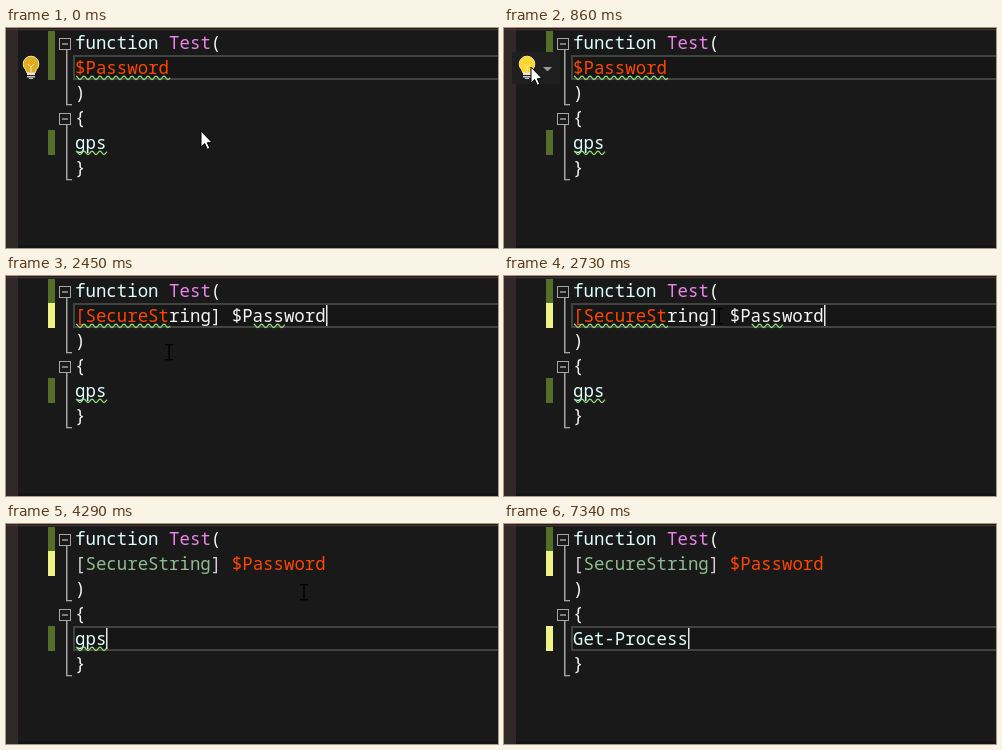
Recreate the animation shown at these times as an HTML page with a canvas. Size 492x220 px, loop 7500 ms.

```html
<!DOCTYPE html>
<html lang="en">
<head>
<meta charset="utf-8">
<title>Editor quick fixes</title>
<style>
html, body { margin: 0; width: 100%; height: 100%; overflow: hidden; background: #191919; }
canvas { display: block; width: 492px; height: 220px; }
</style>
</head>
<body>
<canvas id="stage" width="492" height="220"></canvas>
<script>
const ctx = document.getElementById('stage').getContext('2d');
const LOOP = 7500, W = 492, H = 220;
const LEFT = 69, TOP = 2, LINE = 25, CHAR = 10.45, BLINK = 530;
const CODE_FONT = '17.42px "Noto Sans Mono", monospace';
const UI_FONT = '11.2px "Open Sans", "Noto Sans", sans-serif';

// Times of the user's actions
const HOVER = 600, OPEN = 1610, PICK = 2450, CLICK = 3100, UP = 3810, DOWN = 4030;
const OPEN2 = 5050, PICK2 = 6210, EXPAND = 6280, LEAVE = 6840;

const C = {
  bg: '#191919', plain: '#f5f5f5', keyword: '#e0ffff', name: '#ee82ee',
  variable: '#ff4500', type: '#8fbc8f', op: '#d3d3d3', fold: '#a5a5a5',
  saved: '#556f2a', edited: '#eff284', wave: '#95db7d', popup: '#1f1f20', edge: '#3f3f42'
};

// Each move ends at x, y
const START = { x: 195, y: 103 };
const MOVES = [
  { from: 60, to: 660, x: 27, y: 39 },
  { from: 990, to: 1280, x: 142, y: 47 },
  { from: 1280, to: 1580, x: 44, y: 51 },
  { from: 1910, to: 1970, x: 59, y: 64 },
  { from: 1970, to: 2120, x: 163, y: 76 },
  { from: PICK, to: 2730, x: 215, y: 40 },
  { from: 2730, to: 2940, x: 257, y: 41 },
  { from: CLICK, to: 3220, x: 298, y: 68 },
  { from: 6750, to: LEAVE, x: 340, y: 200 }
];

const within = (t, a, b) => t >= a && t < b;

function mouse(t) {
  let { x, y } = START;
  for (const m of MOVES) {
    const u = Math.min(1, Math.max(0, (t - m.from) / (m.to - m.from)));
    const s = u * u * (3 - 2 * u);
    x += (m.x - x) * s;
    y += (m.y - y) * s;
  }
  return [x, y];
}

function passwordLine(t) {
  if (t < PICK) return [['$Password', C.variable]];
  if (t < CLICK) return [['[SecureSt', C.variable], ['ring] $Password', C.plain]];
  return [['[', C.op], ['SecureString', C.type], ['] ', C.op], ['$Password', C.variable]];
}

function codeLines(t) {
  return [
    [['function ', C.keyword], ['Test', C.name], ['(', C.plain]],
    passwordLine(t),
    [[')', C.plain]],
    [['{', C.plain]],
    [[t < EXPAND ? 'gps' : 'Get-Process', C.keyword]],
    [['}', C.plain]]
  ];
}

function caretAt(t, lines) {
  const row = t < UP ? 1 : t < DOWN ? 0 : Math.min(4, 1 + Math.floor((t - DOWN) / 86));
  const length = lines[row].reduce((n, [text]) => n + text.length, 0);
  const col = Math.min(within(t, CLICK, EXPAND) ? 18 : 24, length);
  const blinkOn = t < EXPAND || (t - EXPAND) % (2 * BLINK) < BLINK;
  const hidden = t < PICK || within(t, CLICK + 480, UP) || within(t, OPEN2, EXPAND);
  return { row, col, on: blinkOn && !hidden };
}

function rect(x, y, w, h, color) {
  ctx.fillStyle = color;
  ctx.fillRect(x, y, w, h);
}

function panel(x, y, w, h, fill, border) {
  rect(x, y, w, h, border);
  rect(x + 1, y + 1, w - 2, h - 2, fill);
}

function stroke(color, width) {
  ctx.strokeStyle = color;
  ctx.lineWidth = width;
  ctx.stroke();
}

function write(text, x, y, font, color) {
  ctx.font = font;
  ctx.fillStyle = color;
  ctx.fillText(text, x, y);
}

function codeLine(parts, row) {
  let col = 0;
  for (const [text, color] of parts) {
    write(text, LEFT + col * CHAR, 20.5 + row * LINE, CODE_FONT, color);
    col += text.length;
  }
}

function squiggle(row, col, count) {
  const x0 = LEFT + col * CHAR + 1, y = TOP + row * LINE + 22.8;
  ctx.beginPath();
  for (let x = 0; x <= count * CHAR; x++) ctx.lineTo(x0 + x, y - 1.7 * Math.cos(x * Math.PI / 4));
  stroke(C.wave, 1.2);
}

function fold(row, rows) {
  const y = TOP + row * LINE + 8, end = TOP + (row + rows) * LINE;
  rect(60, y + 12, 1.5, end - y - 12, C.fold);
  rect(60, end - 1, 6, 1.3, C.fold);
  panel(53, y, 12, 12, C.bg, C.fold);
  rect(56, y + 5.5, 6, 1, '#e0e0e0');
}

function bulb(x, y, color) {
  ctx.beginPath();
  ctx.arc(x, y, 7.8, Math.PI * 0.75, Math.PI * 0.25);
  ctx.lineTo(x + 4, y + 9);
  ctx.lineTo(x - 4, y + 9);
  ctx.closePath();
  ctx.fillStyle = color;
  ctx.fill();
  stroke('#f8e6ac', 1);
  ctx.beginPath();
  ctx.moveTo(x - 3, y);
  ctx.lineTo(x, y + 3);
  ctx.lineTo(x + 3, y);
  ctx.moveTo(x, y + 3);
  ctx.lineTo(x, y + 8);
  stroke('#f8e6ac', 1);
  rect(x - 4, y + 9, 8, 2, '#e8e8e8');
  rect(x - 4, y + 12, 8, 1.5, '#d0d0d0');
  rect(x - 2, y + 14, 4, 1, '#d0d0d0');
}

function bulbButton(y) {
  rect(8, y, 48, 32, C.popup);
  bulb(23, y + 12, '#ffd52e');
  for (let i = 0; i < 4; i++) rect(39.5 + i, y + 15 + i, 8 - 2 * i, 1, '#999999');
}

function menu(y, w, text) {
  panel(8, y, w, 27, '#2a2426', C.edge);
  write(text, 14, y + 18, UI_FONT, '#ffffff');
}

function preview(x, y, w, text) {
  panel(x, y, w, 31, C.popup, C.edge);
  write(text, x + 8, y + 20, UI_FONT, '#ffffff');
}

function arrow(x, y) {
  ctx.save();
  ctx.translate(x, y);
  const shape = new Path2D('M0 0V16L3.7 12.6 6.3 18.3 8.8 17.2 6.3 11.7 11 11.5Z');
  ctx.fillStyle = '#ffffff';
  ctx.fill(shape);
  ctx.strokeStyle = '#000000';
  ctx.lineWidth = 1;
  ctx.stroke(shape);
  ctx.restore();
}

function beam(x, y) {
  rect(x - 0.7, y - 8, 1.4, 16, '#000000');
  for (const end of [-8, 7]) rect(x - 4, y + end, 8, 1.3, '#000000');
}

function draw(t) {
  const lines = codeLines(t), caret = caretAt(t, lines);
  const rowY = TOP + caret.row * LINE;

  rect(0, 0, W, H, C.bg);
  rect(0, 0, 12, H, '#2f2728');
  rect(0, 1, W, 1.2, '#4a2f33');
  rect(12, 217, W, 3, '#151414');

  // Current line
  rect(67, rowY, W - 67, LINE, '#42423f');
  rect(69, rowY + 2, W - 69, LINE - 4, '#161616');

  // Change bars
  rect(42, 3, 7, 24, C.saved);
  rect(42, 27, 7, 25, t < PICK ? C.saved : C.edited);
  rect(42, 102, 7, 25, t < EXPAND ? C.saved : C.edited);

  fold(0, 3);
  fold(3, 3);
  lines.forEach(codeLine);
  if (t < CLICK) squiggle(1, 0, 9);
  if (within(t, PICK, CLICK)) squiggle(1, 17, 3);
  if (t < EXPAND) squiggle(4, 0, 3);
  if (caret.on) rect(Math.round(LEFT + caret.col * CHAR), rowY + 2, 1.5, 21, '#e6e6e6');

  if (t < HOVER) bulb(25, 36, '#e0ad20');
  else if (t < PICK) bulbButton(24);
  if (within(t, OPEN, PICK)) menu(57, 220, 'Set $Password type to SecureString');
  if (within(t, OPEN + 100, PICK)) preview(225, 59, 149, '[SecureString] $Password');

  if (within(t, OPEN2, EXPAND)) bulbButton(98);
  if (within(t, OPEN2, PICK2)) menu(131, 191, 'Replace gps with Get-Process');
  if (within(t, OPEN2 + 30, EXPAND)) preview(196, 133, 79, 'Get-Process');

  if (t < PICK) arrow(...mouse(t));
  else if (t < LEAVE) beam(...mouse(t));
}

const start = performance.now();
function tick() {
  draw((performance.now() - start) % LOOP);
  requestAnimationFrame(tick);
}
tick();
</script>
</body>
</html>
```
